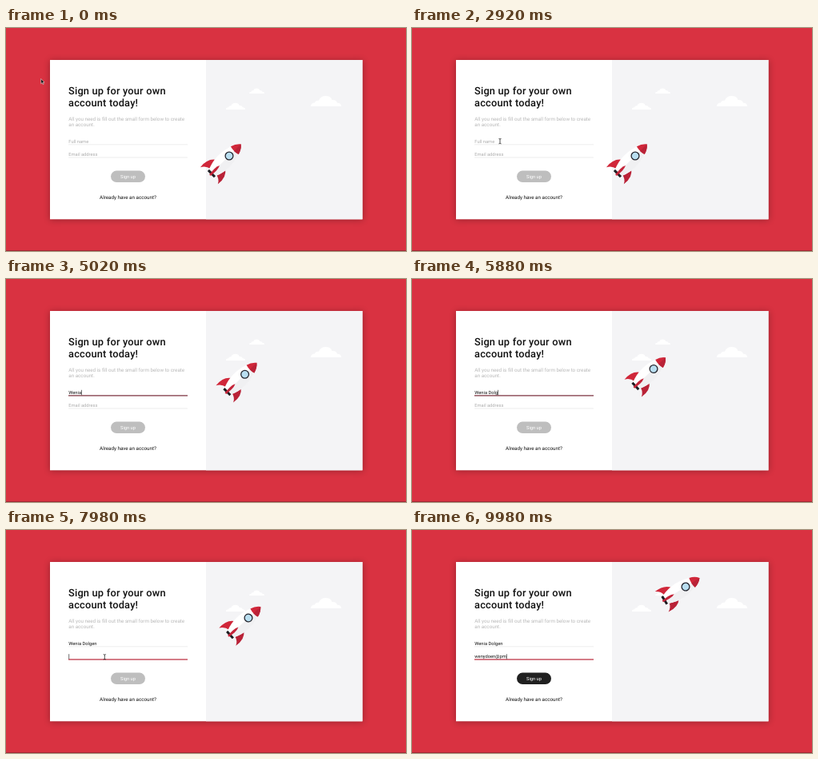
These frames come from a looping animation (500x279 px, 10 s). An HTML page with a canvas:

```html
<!DOCTYPE html>
<html lang="en">
<head>
<meta charset="utf-8">
<title>Sign up</title>
<style>
html, body { margin: 0; width: 100%; height: 100%; overflow: hidden; background: #d93241; }
canvas, svg { position: absolute; left: 0; top: 0; width: 500px; height: 279px; }
text { font-family: Roboto, sans-serif; font-size: 6.25px; white-space: pre; text-rendering: geometricPrecision; }
.title { font-size: 12.8px; font-weight: 500; letter-spacing: .2px; fill: #111; }
.note { fill: #b8b8b8; }
.field { font-size: 5.75px; }
.button { font-size: 5.75px; fill: #fff; text-anchor: middle; }
.link { fill: #111; text-anchor: middle; }
</style>
</head>
<body>
<canvas id="stage"></canvas>
<svg viewBox="0 0 500 279">
  <text class="title" x="78" y="83.3">Sign up for your own</text>
  <text class="title" x="78" y="98.3">account today!</text>
  <text class="note" x="78.3" y="115.6">All you need is fill out the small form below to create</text>
  <text class="note" x="78.3" y="122.9">an account.</text>
  <text class="field" id="name" x="78.3" y="144"></text>
  <text class="field" id="email" x="78.3" y="160.4"></text>
  <text class="button" x="152.5" y="187.9">Sign up</text>
  <text class="link" x="152.5" y="214.2">Already have an account?</text>
  <rect id="caret" width=".6" height="6.4" fill="#111"/>
  <path id="arrow" d="M0 0V6.2L1.5 4.9L2.5 7.1L3.5 6.7L2.5 4.5H4.4Z" fill="#111" stroke="#fff" stroke-width=".5"/>
  <path id="beam" d="M-1.5-3.2Q0-3.2 0-2.2Q0-3.2 1.5-3.2M0-2.2V2.2M-1.5 3.2Q0 3.2 0 2.2Q0 3.2 1.5 3.2" fill="none" stroke="#222" stroke-width=".8"/>
</svg>
<script>
const LOOP = 10000;
const $ = id => document.getElementById(id);
const canvas = $('stage'), ctx = canvas.getContext('2d');
const ratio = window.devicePixelRatio || 1;
canvas.width = 500 * ratio;
canvas.height = 279 * ratio;

const fields = [
  { node: $('name'), label: 'Full name', value: 'Wenia Dolgen', line: 145.9, accent: '#7d2f3d',
    focus: 3160, blur: 6960, erase: 3420,
    keys: [3880, 4400, 4580, 4780, 4980, 5150, 5290, 5540, 5640, 5760, 6080, 6200] },
  { node: $('email'), label: 'Email address', value: 'wenydoen@pm', line: 162, accent: '#c02f41',
    focus: 6960, blur: LOOP, erase: 7440,
    keys: [8020, 8130, 8230, 8510, 8860, 9020, 9160, 9300, 9540, 9720, 9860] }
];

// time, window x, window y, heading in degrees
const flight = [
  [3880, 279, 160, 45], [4300, 291, 134.5, 45], [4600, 295, 127, 45.2], [5120, 299, 118.5, 45.5],
  [5400, 300, 116.5, 46], [5540, 300, 116.5, 46], [5880, 302, 112.5, 46.5], [6080, 302, 112.5, 46.5],
  [6400, 303, 110, 47.5], [8020, 303, 110, 47.5], [8280, 315, 97.5, 50], [8500, 315, 97.5, 50],
  [8720, 324.5, 88.5, 53], [9460, 338.5, 74.5, 56], [9980, 342, 71, 57.5]
];
const pointer = [
  [0, 43.7, 63.5], [500, 42, 65], [1100, 41.5, 66], [1980, 110, 141.6], [3880, 110, 141.6],
  [6400, 110, 141.6], [6850, 123.3, 158.8], [LOOP, 123.3, 158.8]
];

const clamp = v => Math.max(0, Math.min(1, v));
const ease = v => v * v * (3 - 2 * v);

function track(keys, t) {
  if (t <= keys[0][0]) return keys[0].slice(1);
  const i = keys.findIndex(k => k[0] > t);
  if (i < 0) return keys[keys.length - 1].slice(1);
  const a = keys[i - 1], b = keys[i];
  const f = ease((t - a[0]) / (b[0] - a[0]));
  return a.slice(1).map((v, n) => v + (b[n + 1] - v) * f);
}

function shape(path, fill) {
  ctx.fillStyle = fill;
  ctx.fill(new Path2D(path));
}

function cloud(x, base, width) {
  ctx.save();
  ctx.translate(x, base);
  ctx.scale(width / 38, width / 38);
  shape('M0 0Q0-4.5 5-4.5Q6-8 10-7.2Q12-13 18.5-13Q25-13 26.5-8Q32-8.5 33-4.3Q38-4.5 38 0Z', '#fff');
  ctx.restore();
}

function rocket(x, y, angle) {
  ctx.save();
  ctx.translate(x, y);
  ctx.rotate(angle * Math.PI / 180);
  shape('M-8 15Q-17 21-15.5 35.5Q-12 29-5.5 28Z', '#d0273a');
  shape('M8 15Q17 21 15 35Q12 29 5.5 28Z', '#b92237');
  shape('M-5.7 29.5H5.7V32.7H-5.7Z', '#1d1d22');
  shape('M-6.6-10.5Q-14 10-6 29.5H6Q14 10 6.6-10.5Z', '#fff');
  shape('M0-10.5V29.5H6Q14 10 6.6-10.5Z', '#f0f0f2');
  shape('M0-20.7Q-5.2-16.5-6.9-9.6Q0-7.6 6.9-9.6Q5.2-16.5 0-20.7Z', '#d0273a');
  shape('M0-20.7V-8.6Q3.6-8.6 6.9-9.6Q5.2-16.5 0-20.7Z', '#b92237');
  shape('M0 17Q1.7 20 1.7 25L1.2 34H-1.2L-1.7 25Q-1.7 20 0 17Z', '#c42439');
  ctx.beginPath();
  ctx.arc(0, 0, 4.9, 0, 7);
  ctx.fillStyle = '#b9dff1';
  ctx.fill();
  ctx.lineWidth = 1.3;
  ctx.strokeStyle = '#25262e';
  ctx.stroke();
  ctx.restore();
}

function fieldText(field, t) {
  const typed = field.keys.filter(k => k <= t).length;
  if (typed) return field.value.slice(0, typed);
  const erased = Math.max(0, Math.floor((t - field.erase) / 34));
  return field.label.slice(0, Math.max(0, field.label.length - erased));
}

function drawField(field, t) {
  const active = t >= field.focus && t < field.blur;
  field.node.textContent = fieldText(field, t);
  field.node.setAttribute('fill', t >= field.focus ? '#151515' : '#adadad');
  ctx.fillStyle = '#e2e2e2';
  ctx.fillRect(78, field.line - .3, 149, .6);
  if (!active) return;
  const grow = ease(clamp((t - field.focus) / 200));
  ctx.globalAlpha = grow;
  ctx.fillStyle = field.accent;
  ctx.fillRect(78, field.line - .6, 149, 1.2);
  ctx.globalAlpha = 1;
  const length = field.node.textContent ? field.node.getComputedTextLength() : 0;
  $('caret').setAttribute('x', 78.5 + length);
  $('caret').setAttribute('y', +field.node.getAttribute('y') - 5.2);
}

function drawPointer(t) {
  const [x, y] = track(pointer, t);
  const typing = (t >= 3860 && t < 6400) || t >= 8000;
  const overField = x > 78 && y > 136;
  for (const [id, on] of [['arrow', !overField], ['beam', overField]]) {
    $(id).setAttribute('transform', `translate(${x} ${y})`);
    $(id).style.display = on && !typing ? '' : 'none';
  }
}

function draw(t) {
  ctx.setTransform(ratio, 0, 0, ratio, 0, 0);
  ctx.fillStyle = '#d93241';
  ctx.fillRect(0, 0, 500, 279);
  ctx.fillStyle = 'rgba(40,20,30,.4)';
  ctx.fillRect(0, 278.2, 500, .8);

  ctx.save();
  ctx.shadowColor = 'rgba(0,0,0,.3)';
  ctx.shadowBlur = 8 * ratio;
  ctx.shadowOffsetY = ratio;
  ctx.fillStyle = '#fff';
  ctx.fillRect(55, 40, 390.5, 199.3);
  ctx.restore();
  ctx.fillStyle = '#f4f4f6';
  ctx.fillRect(250, 40, 195.5, 199.3);

  cloud(275, 102, 24);
  cloud(304, 82, 19);
  cloud(381, 98, 38);
  rocket(...track(flight, t));

  const ready = clamp((t - fields[1].keys[0]) / 200);
  const shade = Math.round(190 - 158 * ready);
  ctx.fillStyle = `rgb(${shade},${shade},${shade})`;
  ctx.beginPath();
  ctx.roundRect(131, 178.6, 43, 14.4, 7.2);
  ctx.fill();

  $('caret').style.display = t >= fields[0].focus ? '' : 'none';
  fields.forEach(field => drawField(field, t));
  drawPointer(t);
}

const start = performance.now();
function frame() {
  draw((performance.now() - start) % LOOP);
  requestAnimationFrame(frame);
}
frame();
</script>
</body>
</html>
```
